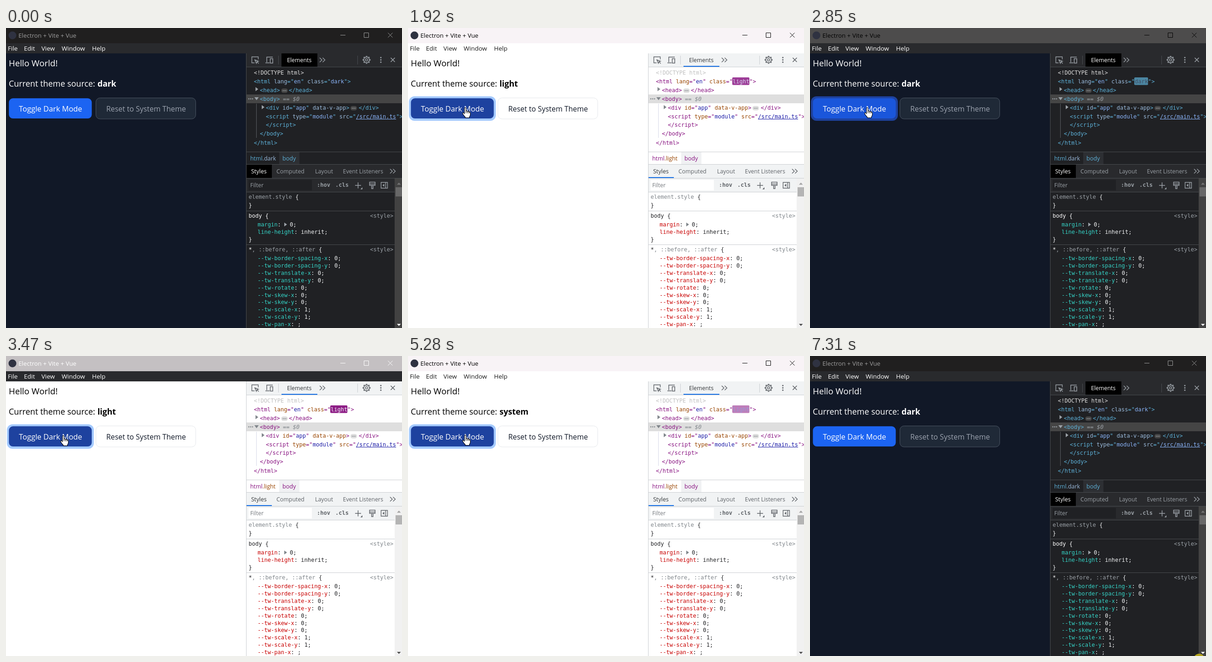
Write an HTML page with a canvas that moves like this. It is 861 px wide and 650 px high and loops after 7400 ms.

```html
<!DOCTYPE html>
<html lang="en">
<head>
<meta charset="utf-8">
<title>Theme toggle</title>
<style>
  html, body { margin: 0; width: 100%; height: 100%; overflow: hidden; background: #202124; }
  canvas { display: block; width: 861px; height: 650px; }
</style>
</head>
<body>
<canvas id="stage" width="861" height="650"></canvas>
<script>
const ctx = document.getElementById('stage').getContext('2d');
const LOOP = 7400;
const SANS = '"Open Sans", "Noto Sans", sans-serif';
const MONO = '"DejaVu Sans Mono", "Liberation Mono", monospace';
const CODE_SIZE = 12.06, CHAR = CODE_SIZE * .602;

const DEV = {
  dark: {
    bg: '#202124', bar: '#292a2d', line: '#494c50', text: '#f1f3f4', strong: '#ffffff',
    soft: '#9aa0a6', icon: '#9aa0a6', tag: '#5db0d7', attr: '#9bbbdc', value: '#8ab4f8',
    prop: '#35d4c7', doctype: '#dedede', row: '#454545', crumb: '#2d2f33', input: '#202124',
    track: '#424242', thumb: '#686868', up: '#757575', down: '#ffffff', guide: '#5c5f63',
    flash: [93, 176, 215], flashText: [32, 33, 36], base: [32, 33, 36], valueRgb: [138, 180, 248]
  },
  light: {
    bg: '#ffffff', bar: '#f1f3f4', line: '#cacdd1', text: '#202124', strong: '#202124',
    soft: '#80868b', icon: '#5f6368', tag: '#881280', attr: '#994500', value: '#1a1aa6',
    prop: '#c80000', doctype: '#c0c0c0', row: '#dedede', crumb: '#f0f1f3', input: '#ffffff',
    track: '#f1f1f1', thumb: '#b4b4b4', up: '#a3a3a3', down: '#505050', guide: '#d5d8e6',
    flash: [136, 18, 128], flashText: [255, 255, 255], base: [255, 255, 255], valueRgb: [26, 26, 166]
  }
};

const PAGE = {
  dark: {
    bg: '#111827', text: '#ffffff',
    main: ['#1c64f2', '#1a56db', '#1e429f'],
    alt: ['#1f2937', '#374151', '#374151'], altText: ['#9ca3af', '#ffffff'], border: '#4b5563'
  },
  light: {
    bg: '#ffffff', text: '#000000',
    main: ['#1a56db', '#1e429f', '#a4cafe'],
    alt: ['#ffffff', '#f3f4f6', '#e5e7eb'], altText: ['#111928', '#1a56db'], border: '#e5e7eb'
  }
};

// Tracks: each entry holds from its time until the next one
const titleTrack = [
  [0, 0, '#9d9d9d'], [1020, 0, '#ffffff'], [1310, .21, '#000000'], [1380, 1, '#000000'],
  [1990, .76, '#ffffff'], [2070, .35, '#ffffff'], [2150, 0, '#ffffff'],
  [2780, .21, '#000000'], [2860, .62, '#000000'], [2940, 1, '#000000'],
  [3470, .76, '#ffffff'], [3560, .35, '#ffffff'], [3640, 0, '#ffffff'],
  [4330, .21, '#000000'], [4410, .62, '#000000'], [4480, 1, '#000000'],
  [5350, .76, '#ffffff'], [5420, .35, '#ffffff'], [5490, 0, '#ffffff'], [7310, 0, '#9d9d9d']
];
const menuTrack = [[0, 'dark'], [1380, 'light'], [1990, 'dark'], [2860, 'light'],
  [3470, 'dark'], [4330, 'light'], [5350, 'dark']];
const pageTrack = [[0, 'dark', 'dark'], [1380, 'light', 'light'], [2070, 'dark', 'dark'],
  [2860, 'light', 'light'], [3560, 'dark', 'dark'], [4330, 'light', 'system'], [5420, 'dark', 'dark']];
const devTrack = [[-LOOP, 'dark'], [1670, 'light'], [2440, 'dark'], [3400, 'light'],
  [3850, 'dark'], [4650, 'light'], [5650, 'dark']];
const ringTrack = [[0, ''], [1020, 'main'], [4180, 'alt'], [5140, 'main'], [7310, '']];
const pointer = [[210, 765, 628], [900, 124.5, 172.5], [3640, 124.5, 172.5], [4050, 275, 175.5],
  [4480, 275, 175.5], [4950, 124.5, 171.5], [5830, 124.5, 171.5], [6560, 822, 622],
  [6630, 822, 622], [7050, 834, 652]];

const at = (track, t) => track.reduce((cur, k) => (k[0] <= t ? k : cur), track[0]);
const mix = (a, b, k) => `rgb(${a.map((v, i) => Math.round(v + (b[i] - v) * k))})`;

function rect(x, y, w, h, color) {
  ctx.fillStyle = color;
  ctx.fillRect(x, y, w, h);
}
function round(x, y, w, h, r, fill, stroke) {
  ctx.beginPath();
  ctx.roundRect(x, y, w, h, r);
  if (fill) { ctx.fillStyle = fill; ctx.fill(); }
  if (stroke) { ctx.strokeStyle = stroke; ctx.lineWidth = 1; ctx.stroke(); }
}
function disc(x, y, r, color) {
  ctx.fillStyle = color;
  ctx.beginPath();
  ctx.arc(x, y, r, 0, 7);
  ctx.fill();
}
function path(d, stroke, width = 1, fill) {
  const p = new Path2D(d);
  if (fill) { ctx.fillStyle = fill; ctx.fill(p); }
  if (stroke) { ctx.strokeStyle = stroke; ctx.lineWidth = width; ctx.stroke(p); }
}
function text(str, x, y, size, color, weight = 400) {
  ctx.font = `${weight} ${size}px ${SANS}`;
  ctx.fillStyle = color;
  ctx.fillText(str, x, y);
}
// Monospaced run of alternating strings and colours
function code(x, y, parts, style = '') {
  ctx.font = `${style} ${CODE_SIZE}px ${MONO}`;
  for (let i = 0; i < parts.length; i += 2) {
    ctx.fillStyle = parts[i + 1];
    ctx.fillText(parts[i], x, y);
    x += parts[i].length * CHAR;
  }
}

function drawTitle(t) {
  const [, level, fg] = at(titleTrack, t);
  rect(0, 0, 861, 33, mix([32, 31, 31], [248, 243, 246], level));
  disc(14, 16, 8.5, '#2f3241');
  text('Electron + Vite + Vue', 27, 21, 13.25, fg);
  path('M727 15.5h11M778.5 10.5h10v10h-10zM830.5 10.5l10 10M840.5 10.5l-10 10', fg);
}

function drawMenu(t) {
  const dark = at(menuTrack, t)[1] === 'dark';
  rect(0, 33, 861, 22, dark ? '#292a2d' : '#ffffff');
  const items = { File: 4, Edit: 39, View: 77, Window: 121, Help: 187 };
  for (const name in items) text(name, items[name], 49, 13.5, dark ? '#ffffff' : '#1a1a1a');
}

function drawPage(t, over) {
  const [, theme, source] = at(pageTrack, t);
  const c = PAGE[theme], ring = at(ringTrack, t)[1];
  rect(0, 55, 522, 595, c.bg);
  text('Hello World!', 6, 83, 18.6, c.text);
  text('Current theme source:', 6, 127, 17.9, c.text);
  text(source, 199, 127, 17.6, c.text, 700);

  if (ring === 'main') round(2, 148, 189, 53, 12, c.main[2]);
  round(6.3, 152.3, 180.2, 43.8, 8.8, c.main[over === 'main' ? 1 : 0]);
  text('Toggle Dark Mode', 28, 180.5, 16.35, '#ffffff');

  const hot = over === 'alt' ? 1 : 0;
  if (ring === 'alt') round(191, 147.5, 226, 54, 12, c.alt[2]);
  round(195.5, 151.5, 217, 45.5, 8.8, c.alt[hot], c.border);
  text('Reset to System Theme', 218, 180.5, 15.9, c.altText[hot]);
}

function pill(x, y, c) {
  round(x, y, 14, 9.5, 4.5, c.row);
  for (let i = 0; i < 3; i++) disc(x + 4 + i * 3, y + 4.8, 1, c.soft);
}

function gear(x, y, color) {
  ctx.save();
  ctx.translate(x, y);
  for (let i = 0; i < 8; i++) {
    path('M-1.3-6.2L-.9-8H.9L1.3-6.2', color, 1.2);
    ctx.rotate(Math.PI / 4);
  }
  path('M6 0a6 6 0 1 0-12 0a6 6 0 1 0 12 0M2.5 0a2.5 2.5 0 1 0-5 0a2.5 2.5 0 1 0 5 0', color, 1.4);
  ctx.restore();
}

function drawToolbar(c, dark) {
  rect(522, 55, 339, 29, c.bar);
  path('M548.5 68v-5.5h-14v13h6M541 69l8 3-3.4 1.2-1.3 3.4zM545 72.5l4.5 4.5', c.icon, 1.4);
  path('M567 74v-11h13M564 75.5h9M574.5 66.5h5.5v9.5h-5.5z', c.icon, 1.5);
  path('M592.5 60v19M764.5 60v19', c.line);
  if (dark) rect(599, 55, 78, 29, '#000000');
  text('Elements', 611, 74, 12.4, dark ? '#ffffff' : '#333639');
  path('M682 64.5l5 4.8-5 4.8M688.5 64.5l5 4.8-5 4.8', c.icon, 1.4);
  gear(784, 69, c.icon);
  for (const y of [64, 69, 74]) disc(815, y, 1.6, c.icon);
  path('M836.5 64.5l9 9M845.5 64.5l-9 9', c.icon, 1.6);
  rect(522, 84, 339, 1, c.line);
  if (!dark) rect(599, 82, 78, 2, '#1a73e8');
}

function drawTree(c, theme, flash) {
  rect(523, 144, 338, 19, c.row);
  rect(544, 164, 1, 74, c.guide);
  code(539, 101, ['<!DOCTYPE html>', c.doctype]);
  if (flash > 0) {
    round(705, 107, theme.length * CHAR + 1, 16.5, 2, mix(c.base, c.flash, flash));
  }
  code(539, 120, ['<html', c.tag, ' lang', c.attr, '="', c.tag, 'en', c.value, '"', c.tag,
    ' class', c.attr, '="', c.tag, theme, mix(c.valueRgb, c.flashText, flash), '">', c.tag]);
  path('M542.5 128v9l6-4.5z', null, 0, c.soft);
  code(552, 139, ['<head>', c.tag]);
  pill(598.5, 131, c);
  code(615, 139, ['</head>', c.tag]);
  for (let i = 0; i < 3; i++) disc(528 + i * 4, 153.5, 1.3, c.soft);
  path('M540 150h9.5l-4.7 6.5z', null, 0, c.soft);
  code(552, 158, ['<body>', c.tag]);
  code(602, 158, ['== $0', c.soft], 'italic');
  path('M556 167v9l6-4.5z', null, 0, c.soft);
  code(565, 177, ['<div', c.tag, ' id', c.attr, '="', c.tag, 'app', c.value, '"', c.tag,
    ' data-v-app', c.attr, '>', c.tag]);
  pill(749, 169, c);
  code(767, 177, ['</div>', c.tag]);
  code(565, 196, ['<script', c.tag, ' type', c.attr, '="', c.tag, 'module', c.value, '"', c.tag,
    ' src', c.attr, '="', c.tag, '/src/main.ts', c.value, '">', c.tag]);
  rect(565 + 27 * CHAR, 197, 12 * CHAR, 1, c.value);
  code(565, 214, ['</' + 'script>', c.tag]);
  code(552, 233, ['</body>', c.tag]);
  code(539, 253, ['</html>', c.tag]);

  rect(522, 268, 339, 1, c.line);
  rect(594, 269, 44, 26, c.crumb);
  text('html', 531, 287, 12.4, c.tag);
  text('.' + theme, 531 + ctx.measureText('html').width, 287, 12.4, c.attr);
  text('body', 601, 287, 12.6, c.tag);
}

function drawTabs(c, dark) {
  rect(522, 295, 339, 60, c.bar);
  rect(522, 295, 339, 1, c.line);
  if (dark) rect(523, 296, 55, 29, '#000000');
  text('Styles', 533, 315, 12.5, dark ? '#ffffff' : '#333639');
  const tabs = { Computed: 588, Layout: 672, 'Event Listeners': 732.5 };
  for (const name in tabs) text(name, tabs[name], 315, 12.4, c.icon);
  path('M835 305.5l5 4.8-5 4.8M841.5 305.5l5 4.8-5 4.8', c.icon, 1.4);
  rect(522, 325, 339, 1, c.line);
  if (!dark) rect(523, 323, 55, 2, '#1a73e8');

  rect(527, 329, 138, 23, c.input);
  text('Filter', 531, 345, 12.4, dark ? '#9aa0a6' : '#75797e');
  code(676, 344, [':hov', c.icon], 'bold');
  code(716, 344, ['.cls', c.icon], 'bold');
  path('M765.5 334.5v13M759 341h13', c.icon, 1.5);
  path('M775 345v4.5h-4.5z', null, 0, c.icon);
  path('M790.5 334h12v7h-12zM790.5 338h12M795 341v7h3v-7', c.icon, 1.5);
  path('M815.5 334.5h14v12.5h-14zM825.5 334.5v12.5', c.icon, 1.4);
  path('M822.5 337.5v6.5l-4-3.2z', null, 0, c.icon);
}

function drawStyles(c) {
  rect(522, 355, 323, 1, c.line);
  rect(522, 396, 323, 1, c.line);
  rect(522, 469, 323, 1, c.line);
  code(527.5, 370, ['element.style', c.soft, ' {', c.text]);
  code(527.5, 388, ['}', c.text]);
  code(527.5, 411, ['body {', c.strong]);
  code(791.5, 411, ['<style>', c.soft]);
  code(547, 430, ['margin', c.prop, ':', c.text]);
  path('M605 421.5v8.5l6-4.2z', null, 0, c.soft);
  code(617, 430, ['0;', c.text]);
  code(547, 446, ['line-height', c.prop, ': inherit;', c.text]);
  code(527.5, 462, ['}', c.text]);
  code(527.5, 484, ['*', c.strong, ', ::before, ::after', c.soft, ' {', c.text]);
  code(791.5, 484, ['<style>', c.soft]);
  const vars = ['border-spacing-x: 0', 'border-spacing-y: 0', 'translate-x: 0', 'translate-y: 0',
    'rotate: 0', 'skew-x: 0', 'skew-y: 0', 'scale-x: 1', 'scale-y: 1', 'pan-x: '];
  vars.forEach((item, i) => {
    const [name, value] = item.split(':');
    code(547, Math.round(503 + i * 15.9), ['--tw-' + name, c.prop, ':' + value + ';', c.text]);
  });

  rect(845, 326, 16, 324, c.track);
  rect(847, 345, 14, 20, c.thumb);
  path('M850 339.5h8.5l-4.2-4.5z', null, 0, c.up);
  path('M850 641h8.5l-4.2 4.5z', null, 0, c.down);
}

function drawDev(t) {
  const [start, theme] = at(devTrack, t);
  const c = DEV[theme], dark = theme === 'dark';
  const flash = Math.max(0, 1 - (t - start) / 1400);
  ctx.save();
  ctx.beginPath();
  ctx.rect(521, 55, 340, 595);
  ctx.clip();
  rect(521.5, 55, 340, 595, c.bg);
  drawToolbar(c, dark);
  drawTree(c, theme, flash);
  drawTabs(c, dark);
  drawStyles(c);
  rect(522, 55, 1, 595, c.line);
  ctx.restore();
}

function pointerAt(t) {
  if (t < pointer[0][0] || t >= 7050) return null;
  const i = pointer.findIndex(k => k[0] > t);
  const [t0, x0, y0] = pointer[i - 1], [t1, x1, y1] = pointer[i];
  const u = (t - t0) / (t1 - t0), k = u * u * (3 - 2 * u);
  return [x0 + (x1 - x0) * k, y0 + (y1 - y0) * k];
}

function target(p) {
  if (!p || p[1] < 152 || p[1] > 197) return '';
  if (p[0] > 6 && p[0] < 187) return 'main';
  return p[0] > 195 && p[0] < 413 ? 'alt' : '';
}

const HAND = 'M-1.7 1.7A1.7 1.7 0 0 1 1.7 1.7V8Q2 6.8 3.4 7Q5 7.2 5 8.8Q5.6 7.6 7 8Q8.2 8.4 8.2 9.8' +
  'Q9 9 10 9.6Q11 10.2 11 11.5V15Q11 17.5 9 20V22H0V20.5Q-2.5 18-4.5 15Q-6.5 12-5.2 11.2Q-3.8 10.5-1.7 13Z' +
  'M1.7 8v4M5 8.8v3.4M8.2 9.8v2.8';
const ARROW = 'M0 0V16.5L3.8 12.9L6.3 18.7L8.8 17.6L6.3 12H11.6Z';

function drawPointer(p, over) {
  ctx.save();
  ctx.translate(p[0], p[1]);
  path(over ? HAND : ARROW, '#000000', 1.1, '#ffffff');
  ctx.restore();
}

function frame(now) {
  const t = now % LOOP;
  const p = pointerAt(t), over = target(p);
  drawPage(t, over);
  drawTitle(t);
  drawMenu(t);
  drawDev(t);
  if (p) drawPointer(p, over);
  if (t >= 7310) disc(846, 657, 12, '#b3a41c');
  requestAnimationFrame(frame);
}
requestAnimationFrame(frame);
</script>
</body>
</html>
```
